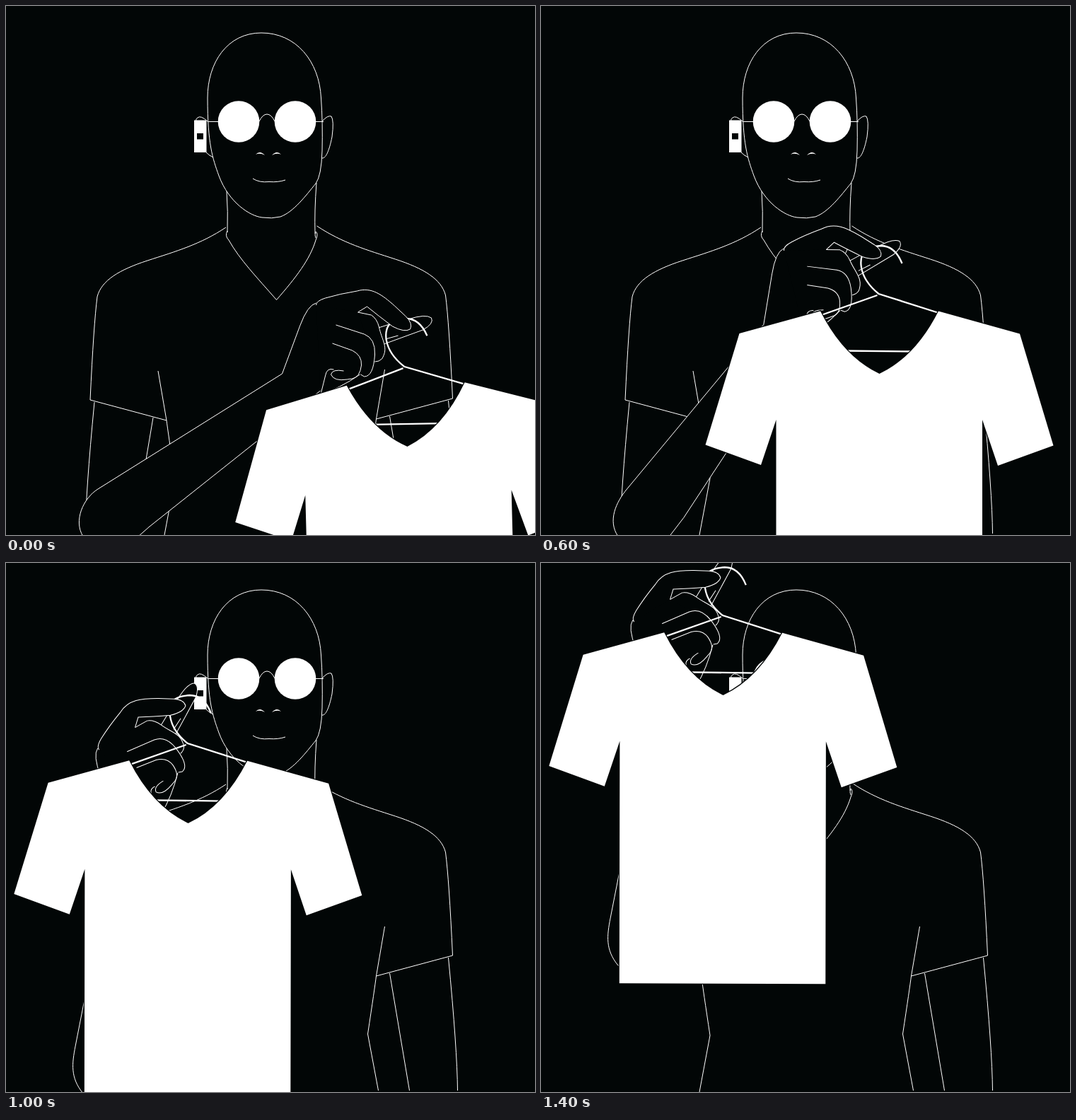
These frames come from a looping animation (748x748 px, 1.5 s). An HTML page:

```html
<!DOCTYPE html>
<html lang="en">
<head>
<meta charset="utf-8">
<title>Shirt on a hanger</title>
<style>
html, body { margin: 0; width: 100%; height: 100%; overflow: hidden; background: #020606; }
svg { display: block; width: 100vw; height: 100vh; }
path { fill: none; stroke: #fff; stroke-width: 1; }
.solid { fill: #020606; }
.white { fill: #fff; stroke: none; }
.wire { stroke-width: 2.3; }
.cloth { fill: #fff; stroke: #020606; stroke-width: 2.5; paint-order: stroke; }
</style>
</head>
<body>
<svg viewBox="0 0 748 748">
  <defs>
    <g id="side">
      <path d="M311 313C275 337 240 347 200 360S135 388 129 411Q124 450 119 557L227 586"/>
      <path d="M215 516L227 586Q229 602 239 668L224 748"/>
    </g>
    <path id="upperArm" d="M125 560Q112.500 690 112 748M208 582L180 748"/>
  </defs>
  <g id="torso">
    <use href="#side"/>
    <use href="#upperArm" id="nearArm"/>
    <g transform="translate(750.500 -2) scale(-1 1)">
      <use href="#side"/>
      <use href="#upperArm"/>
    </g>
    <path d="M312 262Q314 290 313 320M439 250Q436 290 437 322"/>
    <path d="M313 318Q309 325 315 331C330 358 355 384 382.500 415.500C410 384 430 358 438 331Q442 322 438 319Q436 324 438 328"/>
  </g>
  <g id="head">
    <path d="M361 38C313 38 285 80 285 130C285 195 292 215 301 240C315 278 345 297 362 299Q376 301 388 298C407 291 424 268 438 251Q446 240 447 205Q448 165 445.500 130C443 78 410 38 361 38Z"/>
    <path d="M447 163Q455 154 460 156Q464 162 461 185C457 205 452 216 447 215"/>
    <path d="M285 163Q275 154 271 158Q267 160 270 165M283 207Q288 212 293 214"/>
    <path d="M285 163.500H300M438 163.500H449M358 163Q363 153 369 153T380 163"/>
    <path d="M349 244Q358 250 372 248.500Q385 249.500 395 246"/>
    <path class="white" d="M353 210Q359 203.500 366 211Q359 207 353 210M376 211Q383 203.500 389 210Q383 207 376 211"/>
    <circle class="white" cx="329" cy="163.500" r="29.300"/>
    <circle class="white" cx="409" cy="163.500" r="29.300"/>
    <path class="white" fill-rule="evenodd" d="M266 161.500h17.500v45.500h-17.500zM270 180v8.500h9v-8.500z"/>
  </g>
  <g class="hand">
    <path class="solid" style="stroke:none" d="M437 418L500 402 533 460 533 490 520 500 514 518 498 522 443 546 389 517 421 440Z"/>
  </g>
  <path id="arm" class="solid"/>
  <g class="hand">
    <path class="solid" d="M567 440Q592 432 600 438Q604 446 588 455L533 475"/>
    <path d="M525 452L541 447M535 468L553 463"/>
    <path class="solid" d="M496 430L515 434Q523 439 526 451C530 470 540 480 530 496Q526 500 520 500"/>
    <path d="M465 448L505 461Q521 467 520 490Q518 521 505 521L500 518"/>
    <path d="M460 474L488 484Q502 491 501 505Q499 522 488 524L481 525Q462 528 458 518Q460 510 476 513"/>
    <path d="M462 511Q452 508 450 520L443 548M443 546Q470 538 499 518"/>
  </g>
  <g id="shirt">
    <path class="wire" d="M32 -156C24 -176 12 -181 2 -181Q-12 -180 -18 -176C-30 -168 -32 -138 -1 -113L84 -86"/>
    <path class="wire" d="M-3 -111L-82 -83M-50 -32.500L50 -31.500"/>
    <path class="cloth" d="M0 0Q-51 -24 -83.500 -88.500L-198 -57 -246 100.500 -167.500 129 -146 65V407.500L145.500 408V65L167.500 130 246 101.500 198.500 -56.500 83.500 -88.500Q51 -24 0 0Z"/>
  </g>
  <g class="hand">
    <path class="solid" d="M437 420Q437 414 450 410Q470 404 495 400C515 394 530 405 548 421L564 436Q574 446 570 454Q562 459 545 450Q525 435 509 422L496 430"/>
  </g>
</svg>
<script>
// time, neckline x and y, shirt tilt, hand turn
const keys = [
  [0, 567.5, 623, -1.5, 0],
  [400, 527.5, 561.5, -3.3, -8.3],
  [600, 478.5, 520, 0, -11],
  [800, 385.5, 453, 0.2, -26.4],
  [1000, 257.5, 368, 0.1, -41.4],
  [1200, 257.5, 298, 0.1, -41.4],
  [1400, 257.5, 187, 0.1, -41.4]
];
const grip = [570, 453];
const $ = id => document.getElementById(id);
const hands = document.querySelectorAll('.hand');

function pose(time) {
  const i = Math.max(1, keys.findIndex(k => k[0] >= time));
  const a = keys[i - 1], b = keys[i];
  const u = ((time - a[0]) / (b[0] - a[0])) ** 1.15;
  return a.map((v, j) => v + (b[j] - v) * u);
}

// The wrist follows the hand; the elbow swings with its turn and rises with the lift.
function armPath(tipX, tipY, turn, lift) {
  const cos = Math.cos(turn * Math.PI / 180), sin = Math.sin(turn * Math.PI / 180);
  const onHand = (x, y) => {
    const dx = x - grip[0], dy = y - grip[1];
    return [tipX + dx * cos - dy * sin, tipY + dx * sin + dy * cos];
  };
  const fixed = (x, y) => [x, y + lift];
  const toward = (a, b, u) => a.map((v, i) => v + (b[i] - v) * u);
  const corner = onHand(425, 420), wrist = onHand(389, 517);
  const elbow = fixed(130 + turn * .77, 683);
  return `M${onHand(437, 417)}Q${corner} ${toward(corner, wrist, .3)}L${wrist} ${elbow}` +
    `C${toward(wrist, elbow, 1.08)} ${fixed(95 + turn * .1, 728)} ${fixed(109, 750)}` +
    `L${fixed(170, 765)} ${fixed(203 + turn * .1, 736 + turn * 1.15)} ${onHand(443, 541)}`;
}

function draw(now) {
  const [time, x, y, tilt, turn] = pose(Math.floor(now % 1500 / 100) * 100);
  const tipX = x + 4 + turn * .2, tipY = y - 167;
  $('shirt').setAttribute('transform', `translate(${x} ${y}) rotate(${tilt})`);
  for (const hand of hands)
    hand.setAttribute('transform', `translate(${tipX} ${tipY}) rotate(${turn}) translate(${-grip[0]} ${-grip[1]})`);
  $('arm').setAttribute('d', armPath(tipX, tipY, turn, Math.min(0, y - 368)));
  $('nearArm').style.display = time < 1000 ? '' : 'none';
}

function tick() {
  draw(performance.now());
  requestAnimationFrame(tick);
}
tick();
</script>
</body>
</html>
```
